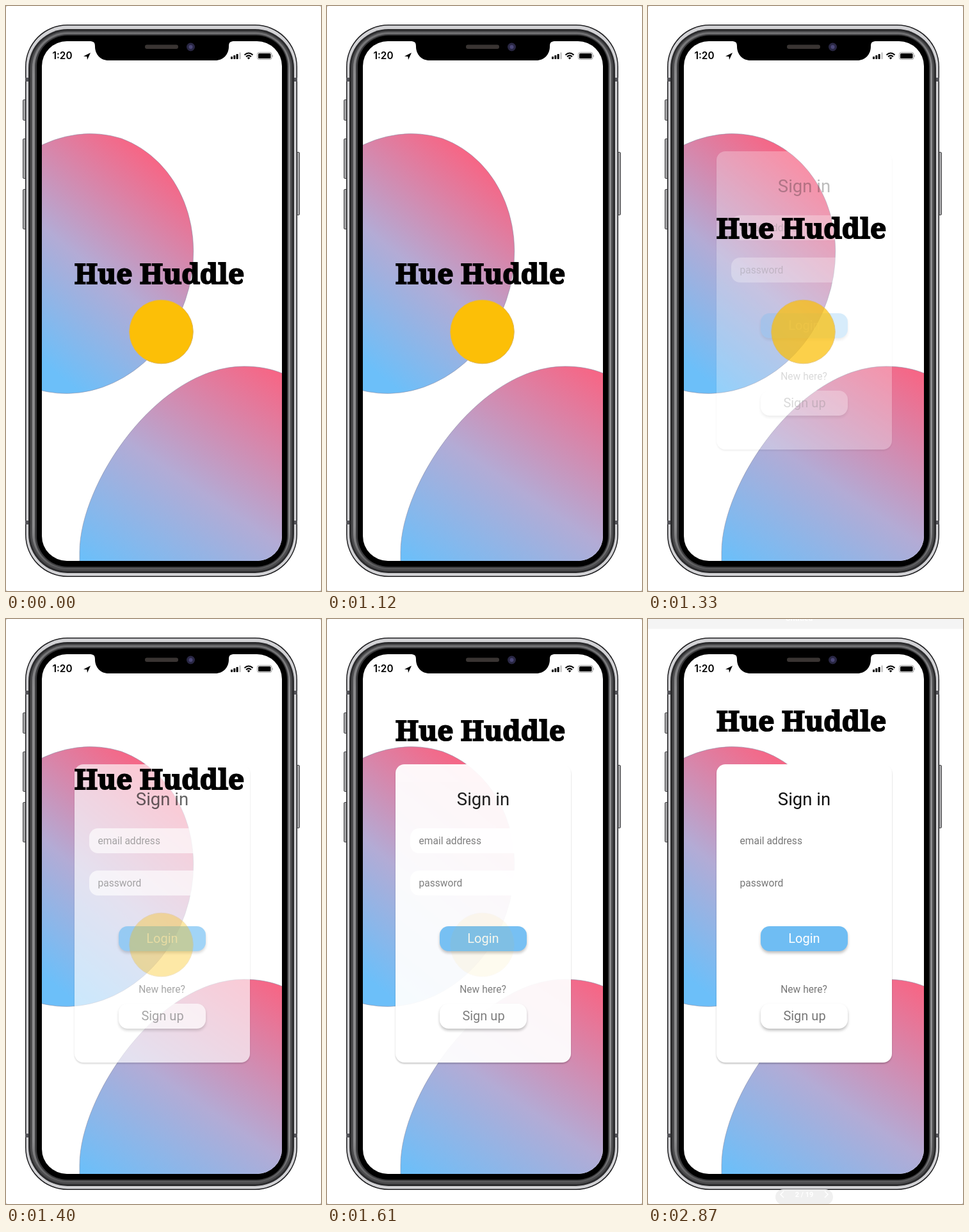
Recreate the animation shown at these times as an HTML page. Size 492 by 914 pixels, loop 2940 ms.

```html
<!DOCTYPE html>
<html lang="en">
<head>
<meta charset="utf-8">
<title>Sign-in transition</title>
<style>
  html, body { margin: 0; width: 100%; height: 100%; overflow: hidden; background: #fff; }
  svg { display: block; width: 100%; height: 100%; }
  text { font-family: Roboto, sans-serif; }
  .middle { text-anchor: middle; }
  .form > * { opacity: var(--shown); }
  .form .small { font-size: 15.6px; fill: #777; }
  .form .label { font-size: 20px; }
  .raised { filter: drop-shadow(0 3px 2px rgba(0, 0, 0, .25)); }
  .card { filter: drop-shadow(0 2px 1.2px rgba(0, 0, 0, .22)); }
  .blob { stroke: #8b8da5; stroke-opacity: .6; }
  #title { font: 700 44px "Noto Serif", serif; stroke: #000; stroke-width: 2px; }
</style>
</head>
<body>
<svg viewBox="0 0 492 914">
  <defs>
    <linearGradient id="sunset">
      <stop offset="0" stop-color="#fa6281"/>
      <stop offset=".55" stop-color="#b3abd5"/>
      <stop offset="1" stop-color="#6cbff9"/>
    </linearGradient>
    <linearGradient id="upper" href="#sunset" gradientUnits="userSpaceOnUse" x1="285" y1="270" x2="55" y2="555"/>
    <linearGradient id="lower" href="#sunset" gradientUnits="userSpaceOnUse" x1="425" y1="560" x2="189" y2="910"/>
    <linearGradient id="metal" x2="0" y2="1">
      <stop offset="0" stop-color="#707072"/>
      <stop offset=".08" stop-color="#8b8b8d"/>
      <stop offset=".92" stop-color="#8b8b8d"/>
      <stop offset="1" stop-color="#5c5c5e"/>
    </linearGradient>
    <clipPath id="screen"><rect x="56" y="55" width="375" height="812" rx="39"/></clipPath>
  </defs>

  <rect width="492" height="914" fill="#c4c4c4"/>
  <rect width="492" height="914" rx="3" fill="#fff"/>

  <!-- Phone body -->
  <g fill="#a4a4a6" stroke="#4a4a4c">
    <rect x="26.5" y="146.5" width="6" height="32" rx="1.5"/>
    <rect x="26.5" y="207.5" width="6" height="62" rx="1.5"/>
    <rect x="26.5" y="286.5" width="6" height="62" rx="1.5"/>
    <rect x="452.5" y="228.5" width="6" height="98" rx="1.5"/>
  </g>
  <rect x="30" y="29" width="425" height="863" rx="66" fill="#1e1e20"/>
  <rect x="31.5" y="30.5" width="422" height="860" rx="64.5" fill="#d2d2d5"/>
  <g fill="#55555a">
    <rect x="30" y="112" width="425" height="6"/>
    <rect x="30" y="804" width="425" height="6"/>
  </g>
  <rect x="35" y="36" width="415" height="850" rx="61" fill="#2c2c2e"/>
  <rect x="38" y="39" width="409" height="844" rx="58" fill="#4c4c4e"/>
  <rect x="41" y="41" width="403" height="839" rx="55" fill="url(#metal)"/>
  <rect x="45" y="44" width="396" height="834" rx="51" fill="#3c3c3e"/>
  <rect x="48" y="46" width="391" height="830" rx="48"/>

  <g clip-path="url(#screen)">
    <rect x="56" y="55" width="375" height="812" fill="#fff"/>
    <path class="blob" fill="url(#lower)"
      d="M115 869V853C115 746 237 563 372 563C395 563 415 567 433 574.5V869Z"/>
    <path class="blob" fill="url(#upper)"
      d="M180.3 207A180.1 206.8 19 0 1 45.7 598A180.1 206.8 19 0 1 180.3 207Z"/>

    <g class="form">
      <rect class="card" x="107" y="227" width="274" height="466" rx="14" fill="#fff"/>
      <text class="middle" x="244" y="291" font-size="27.5" fill="#111">Sign in</text>
      <rect x="130" y="327" width="228" height="39" rx="14" fill="#fff"/>
      <text class="small" x="143.5" y="352">email address</text>
      <rect x="130" y="393" width="228" height="39" rx="14" fill="#fff"/>
      <text class="small" x="143.5" y="418">password</text>
      <rect class="raised" x="176" y="480" width="136" height="39" rx="14" fill="#6fbdf3"/>
      <text class="label middle" x="244" y="506" fill="#fff">Login</text>
      <text class="small middle" x="243.5" y="584">New here?</text>
      <rect class="raised" x="176" y="601" width="136" height="39" rx="14" fill="#fff"/>
      <text class="label middle" x="244.5" y="627" fill="#777">Sign up</text>
    </g>

    <circle id="badge" cx="242.5" cy="509" r="49.8" fill="#fcbf07" stroke="#dcb55c"/>
    <text id="title" class="middle" x="239.5" y="434">Hue Huddle</text>
  </g>

  <!-- Notch and status bar -->
  <path d="M130 54V55C137 55 139 57 139 63C139 76 148 85 160 85H327C339 85 348 76 348 63C348 57 350 55 357 55V54Z"/>
  <rect x="217" y="60.5" width="52" height="6.5" rx="3.2" fill="#393432"/>
  <circle cx="288.5" cy="64" r="6.5" fill="#292744"/>
  <circle cx="288.5" cy="64" r="3" fill="#4b4777"/>
  <text x="72.5" y="83" style="font: 600 15.3px Inter, sans-serif">1:20</text>
  <path d="M121 78.5L132 73L127 84L126.3 79Z"/>
  <rect x="351" y="79" width="3" height="4" rx=".7"/>
  <rect x="355.3" y="77" width="3" height="6" rx=".7"/>
  <rect x="359.6" y="75" width="3" height="8" rx=".7"/>
  <rect x="364" y="72.5" width="3" height="10.5" rx=".7" fill="#ccc"/>
  <g fill="none" stroke="#000" stroke-width="2">
    <path d="M372.5 76.5Q379 70.5 385.5 76.5"/>
    <path d="M375 79.2Q379 75.6 383 79.2"/>
  </g>
  <path d="M376.7 81Q379 79 381.3 81L379 83.5Z"/>
  <rect x="392.5" y="72.5" width="22.5" height="11" rx="3" fill="none" stroke="#999"/>
  <rect x="394" y="74" width="19.5" height="8" rx="1.6"/>
  <path d="M416 76.2Q418 78 416 79.8Z" fill="#999"/>

  <!-- Viewer controls -->
  <g id="controls">
    <rect width="492" height="15.5" fill="#f4f4f4"/>
    <text class="middle" x="236" y="3" font-size="12" font-weight="700" fill="#fff">Untitled</text>
    <rect x="199" y="891" width="90" height="24" rx="12" fill="#efefef" fill-opacity=".9"/>
    <text class="middle" x="244" y="903" font-size="11" font-weight="700" fill="#fff">2 / 19</text>
    <path d="M212 894L207 899L212 904M276 894L281 899L276 904" fill="none" stroke="#fff" stroke-width="1.5"/>
  </g>
</svg>
<script>
  const LOOP = 2940, STEP = 70, START = 1120, TITLE_RISE = 259.5;
  // Transition progress, one value per step from START on
  const progress = [0, .03, .11, .275, .646, .78, .88, .942, 1];
  const byId = id => document.getElementById(id);
  const clamp = (value, low, high) => Math.min(high, Math.max(low, value));

  function draw(now) {
    const time = Math.floor((now % LOOP) / STEP) * STEP;
    const shown = progress[clamp((time - START) / STEP, 0, progress.length - 1)];
    document.documentElement.style.setProperty('--shown', shown);
    byId('badge').style.opacity = 1 - shown;
    byId('title').setAttribute('transform', `translate(0 ${-TITLE_RISE * shown})`);
    byId('controls').style.opacity = clamp((time - 2590) / 280, 0, 1);
    requestAnimationFrame(draw);
  }
  draw(performance.now());
</script>
</body>
</html>
```
